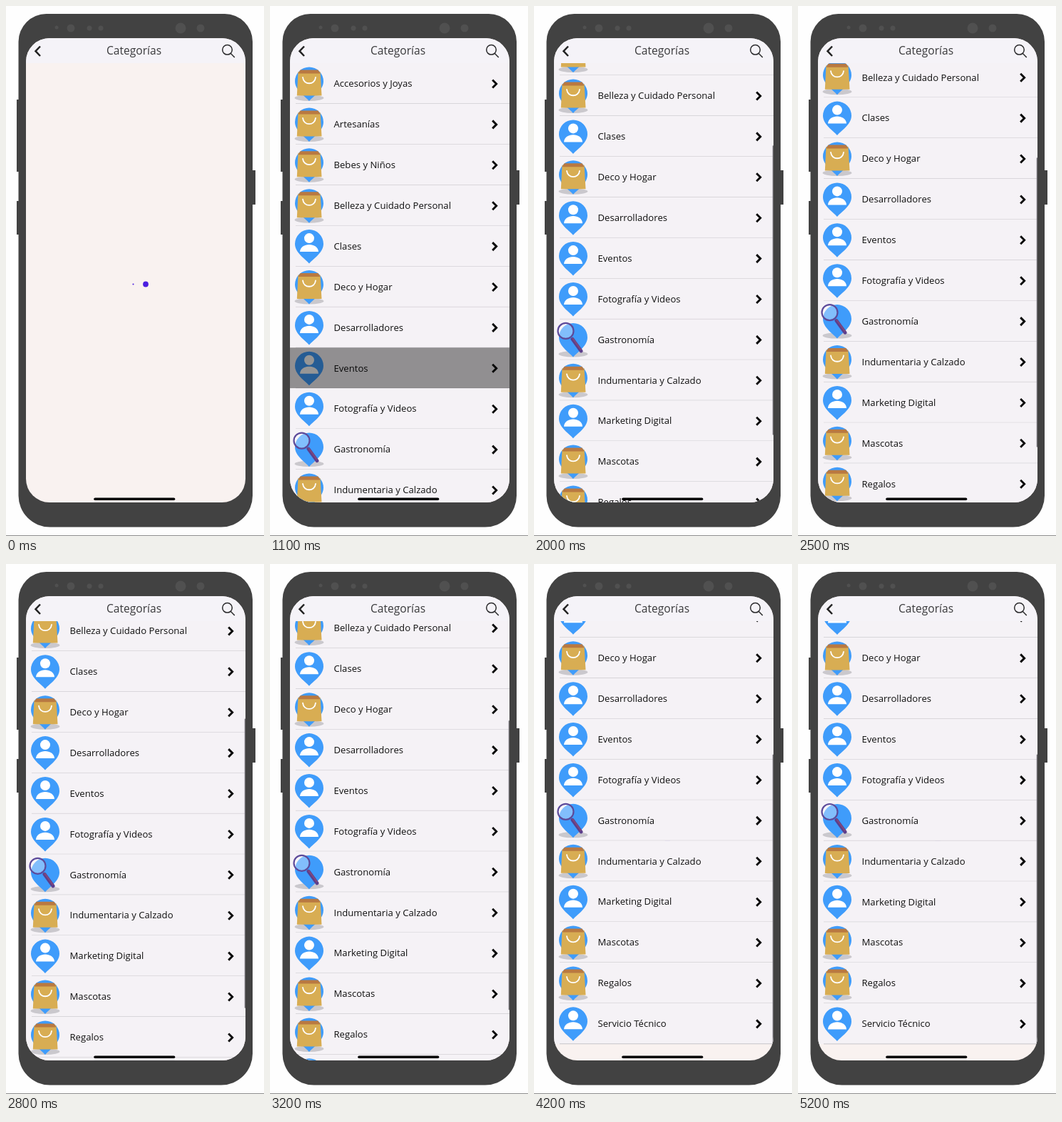
Animation of 362 by 742 pixels, one loop 5.3 s. Source, as an HTML page:

```html
<!DOCTYPE html>
<html lang="es">
<head>
<meta charset="utf-8">
<style>
html, body { margin: 0; width: 100%; height: 100%; overflow: hidden; background: #fefefe; }
svg { display: block; width: 362px; height: 742px; }
text { font-family: "Open Sans", "Noto Sans", sans-serif; }
</style>
</head>
<body>
<svg viewBox="0 0 362 742" fill="none">
  <defs>
    <clipPath id="screen"><rect x="28" y="45" width="308" height="650" rx="33"/></clipPath>
    <clipPath id="view"><rect x="28" y="80" width="309" height="615"/></clipPath>
    <path id="pin" fill="#3f9cfb" d="M55 53C49 46 35 38 35 25.5a20 20 0 0 1 40 0C75 38 61 46 55 53Z"/>
    <ellipse id="shade" cx="55" cy="48.8" rx="20.5" ry="4.2" fill="#cac8cd"/>
    <g id="user">
      <use href="#pin"/>
      <g fill="#fff"><circle cx="55" cy="17.5" r="7"/><path d="M42 36.5C42.5 23 67.5 23 68 36.5Z"/></g>
    </g>
    <g id="bag">
      <use href="#shade"/><use href="#pin"/>
      <path fill="#d8ad53" d="M39.5 12H70.5L72.5 45.5H37.8Z"/>
      <path fill="#b97941" d="M42.5 9.5H67.5L70.5 14.5H39.5Z"/>
      <path stroke="#fff" stroke-width="1.8" stroke-linecap="round" d="M46 20C47 31 63 31 64 20"/>
    </g>
    <g id="lens">
      <use href="#shade"/><use href="#pin"/>
      <path stroke="#5c3f8c" stroke-width="5" stroke-linecap="round" d="M54 28L66 44.5"/>
      <path stroke="#8a4a78" stroke-width="1.5" d="M54 26.5L66 43"/>
      <circle cx="44.5" cy="16.5" r="11" fill="#fff" fill-opacity=".35" stroke="#5d4a9a" stroke-width="2.2"/>
    </g>
  </defs>

  <path stroke="#8d8d8d" d="M0 741.5H362"/>
  <g fill="#424242">
    <path d="M15 131h4v101h-4zM15 273h4v47h-4zM345 230h5v48h-5z"/>
    <path d="M17.5 50a39 39 0 0 1 39-39H307a39 39 0 0 1 39 39V685.500a44 44 0 0 1-44 44H61.500a44 44 0 0 1-44-44Z"/>
  </g>
  <g fill="#505050">
    <circle cx="71" cy="30" r="2.5"/><circle cx="91" cy="31" r="5.5"/><circle cx="117" cy="31" r="3.5"/>
    <circle cx="133" cy="31" r="3.5"/><circle cx="245" cy="31" r="7.5"/><circle cx="273" cy="31" r="5.5"/>
  </g>

  <g clip-path="url(#screen)">
    <path fill="#f9f2f0" d="M28 45h309v650H28z"/>
    <g id="loader" fill="#4b1fe0"></g>
    <g id="content" clip-path="url(#view)">
      <g id="list"></g>
      <rect id="bar" x="334.7" width="1.5" height="405" fill="#77757a"/>
    </g>
    <path fill="#f5f3f8" d="M28 45h309v35H28z"/>
    <path stroke="#222" stroke-width="2.5" d="M48 56.5L41.5 63.2L48 70"/>
    <text x="179.5" y="68.2" font-size="15.6" text-anchor="middle" fill="#3a3a3c">Categorías</text>
    <g stroke="#2c2c2e" stroke-width="1.5"><circle cx="310.5" cy="61.3" r="6.8"/><path d="M315.2 66.2L320.8 72"/></g>
    <path stroke="#000" stroke-width="3.6" stroke-linecap="round" d="M125 690.3H235.5"/>
  </g>
</svg>
<script>
const LOOP = 5300, STEP = 100, ROW = 56.9, TOP = 80, END = 261.6;
const $ = id => document.getElementById(id);
const rows = [
  ['Accesorios y Joyas', 'bag'], ['Artesanías', 'bag'], ['Bebes y Niños', 'bag'],
  ['Belleza y Cuidado Personal', 'bag'], ['Clases', 'user'], ['Deco y Hogar', 'bag'],
  ['Desarrolladores', 'user'], ['Eventos', 'user'], ['Fotografía y Videos', 'user'],
  ['Gastronomía', 'lens'], ['Indumentaria y Calzado', 'bag'], ['Marketing Digital', 'user'],
  ['Mascotas', 'bag'], ['Regalos', 'bag'], ['Servicio Técnico', 'user']
];

$('list').innerHTML = rows.map(([name, icon], i) => `
  <g transform="translate(0 ${i * ROW})">
    <path fill="#f5f2f6" d="M28 0h309v${ROW}H28z"/>
    <path stroke="#c6c4c9" d="M36 ${ROW}H337"/>
    <use href="#${icon}"/>
    <text x="89.5" y="33.3" font-size="13.14" fill="#111">${name}</text>
    <path stroke="#0a0a0a" stroke-width="2.9" d="M312.2 23.5L317.700 29L312.2 34.5"/>
    ${name === 'Eventos' ? `<path id="press" fill="#000" opacity=".41" d="M28 0h309v${ROW}H28z"/>` : ''}
  </g>`).join('');
$('loader').innerHTML = [178.5, 187.3, 196].map(x => `<circle cx="${x}" cy="389.5"/>`).join('');
const dots = [...$('loader').children];

// drag, glide, second flick, then a damped bounce at the end of the list
const glide = t => 192.7 - 92.7 * Math.exp((1600 - t) / 462);
function scrollAt(t) {
  if (t < 1150) return 0;
  if (t < 1400) return glide(1400) * ((t - 1150) / 250) ** 1.4;
  if (t < 3250) return glide(t);
  if (t < 3500) {
    const u = (t - 3250) / 250, from = glide(3250);
    return from + (END - from) * u * (1.6 - 0.6 * u);
  }
  const s = t - 3500;
  return END + 0.114 * s * Math.exp(-s / 110);
}

const show = (id, on) => $(id).setAttribute('visibility', on ? 'inherit' : 'hidden');

function draw(now) {
  const t = Math.floor(now % LOOP / STEP) * STEP;
  const y = scrollAt(t);
  show('content', t >= 600);
  show('press', t >= 1000 && t < 1200);
  show('bar', t >= 1200);
  $('list').setAttribute('transform', `translate(0 ${TOP - y})`);
  $('bar').setAttribute('y', 94 + 0.66 * y);
  dots.forEach((dot, i) => {
    const wave = Math.cos(2 * Math.PI * (t / 900 + 0.782 - i / 3));
    dot.setAttribute('r', Math.max(0, 5.2 * wave));
  });
}

const start = performance.now();
function tick() {
  draw(performance.now() - start);
  requestAnimationFrame(tick);
}
tick();
</script>
</body>
</html>
```
